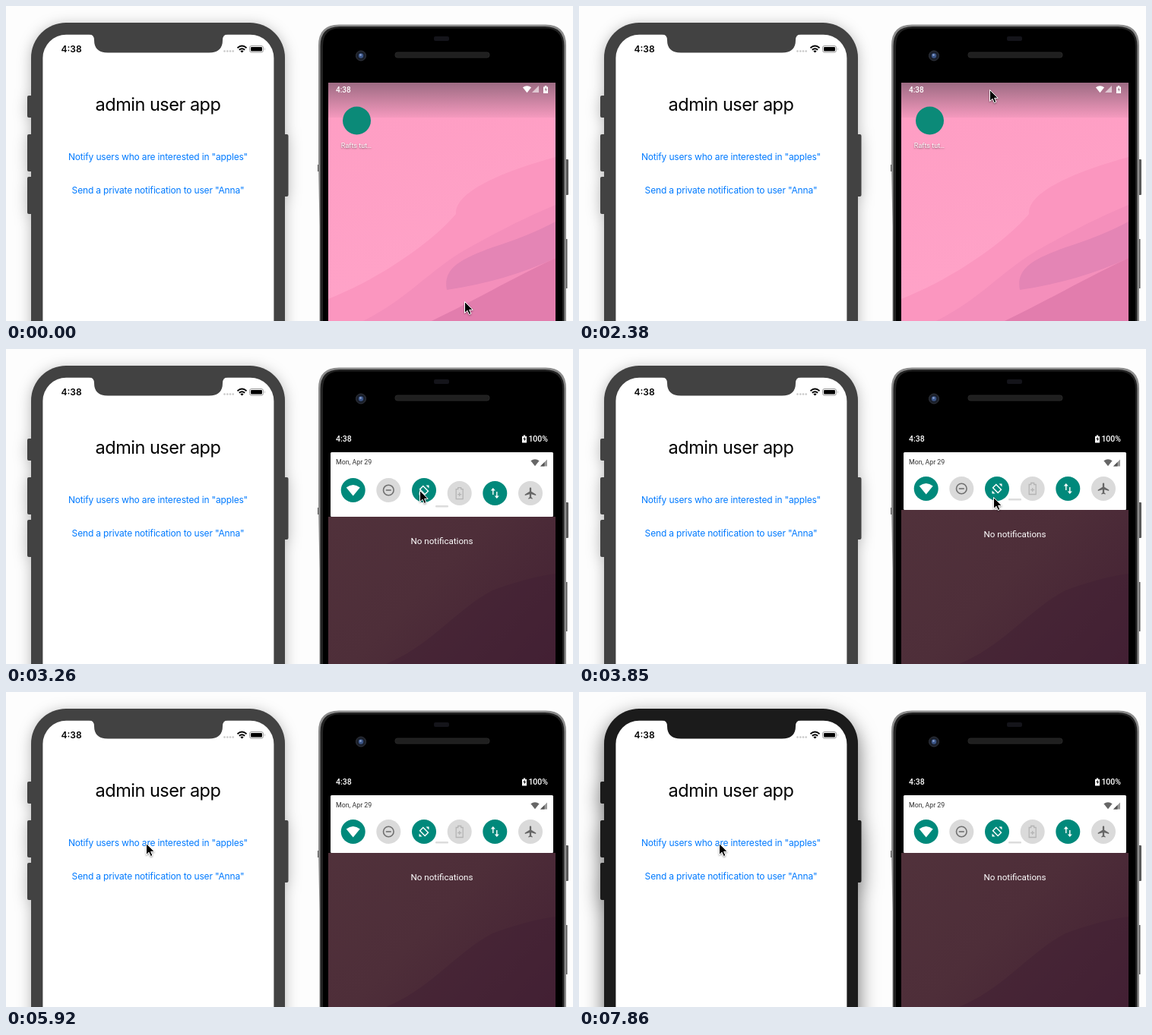
An HTML page for the animation above (8000 ms loop, 746 by 415 pixels).

```html
<!DOCTYPE html>
<html lang="en">
<head>
<meta charset="utf-8">
<title>Notification demo</title>
<style>
  html, body { margin: 0; width: 100%; height: 100%; overflow: hidden; background: #fdfdfd; }
  svg { display: block; width: 746px; height: 415px; }
  text { font-family: Roboto, sans-serif; fill: #fff; }
  .ios text { font-family: Inter, sans-serif; fill: #000; }
  .ios .link { font-size: 12px; letter-spacing: -.17px; fill: #007aff; }
  .body { fill: #424242; filter: drop-shadow(0 3px 9px rgba(0,0,0,.28)); }
  .active .body { fill: #1b1b1b; filter: drop-shadow(0 9px 13px rgba(0,0,0,.58)); }
  .notch { fill: #424242; }
  .active .notch { fill: #1b1b1b; }
  .clock { font-size: 10.5px; font-weight: 500; }
</style>
</head>
<body>
<svg viewBox="0 0 746 415">
  <defs>
    <linearGradient id="scrim" x2="0" y2="1">
      <stop stop-color="#5c4a58" stop-opacity=".6"/><stop offset="1" stop-color="#5c4a58" stop-opacity=".06"/>
    </linearGradient>
    <linearGradient id="pink" x2=".2" y2="1">
      <stop stop-color="#fe9dc3"/><stop offset="1" stop-color="#ffa3c8"/>
    </linearGradient>
    <linearGradient id="dusk" x2="1" y2="1">
      <stop stop-color="#52333c"/><stop offset=".55" stop-color="#4e2e39"/><stop offset="1" stop-color="#432033"/>
    </linearGradient>
    <clipPath id="screen"><path d="M424 101h299v314H424z"/></clipPath>
    <path id="wifi" d="M0 7.5L-9-3.5Q0-10.500 9-3.5Z"/>
    <path id="signal" d="M0 9L9 0V9Z"/>
    <path id="cell" d="M0 1.500H1.800V0H4.200V1.500H6V10H0Z"/>
  </defs>

  <g class="ios" id="ios">
    <g class="body">
      <rect x="33" y="22" width="334" height="500" rx="46"/>
      <path d="M28 120q0-2 2-2h4v29h-4q-2 0-2-2zM28 171q0-2 2-2h4v49h-4q-2 0-2-2zM28 227q0-2 2-2h4v49h-4q-2 0-2-2zM366 169h3.500q2 0 2 2v78q0 2-2 2h-3.500z"/>
    </g>
    <rect x="48.400" y="37.700" width="304" height="470" rx="31" fill="#fff"/>
    <path class="notch" d="M109 37Q116 37.500 116 45Q116 61.600 134 61.600H267Q285 61.600 285 45Q285 37.500 292 37Z"/>
    <text x="72.500" y="61" font-size="12" font-weight="600">4:38</text>
    <g fill="#c8c8c8"><circle cx="287.500" cy="59.500" r="1.300"/><circle cx="291.300" cy="59.500" r="1.300"/><circle cx="295" cy="59.500" r="1.300"/><circle cx="298.700" cy="59.500" r="1.300"/></g>
    <g fill="none" stroke="#000" stroke-width="1.900"><path d="M304.500 55.200Q310.500 50 316.500 55.200M306.800 57.800Q310.500 54.600 314.200 57.800"/></g>
    <path d="M310.500 61.500L308.300 59.300Q310.500 57.500 312.700 59.300Z"/>
    <rect x="320.500" y="52.500" width="18" height="8.500" rx="2.500" fill="none" stroke="#999"/>
    <rect x="322" y="54" width="15" height="5.500" rx="1.200"/>
    <path d="M340 55q1.500 1.700 0 3.500z" fill="#999"/>
    <g text-anchor="middle">
      <text x="200" y="138" font-size="23.500" letter-spacing="-.5">admin user app</text>
      <text class="link" x="200" y="203">Notify users who are interested in "apples"</text>
      <text class="link" x="200" y="247">Send a private notification to user "Anna"</text>
    </g>
  </g>

  <g>
    <path fill="#5a5a5a" d="M736 202h3q1 0 1 1v45q0 1-1 1h-3zM736 307h2.500v65h-2.500zM410 209h3v9h-3z"/>
    <path fill="#8c8c8c" d="M412.500 415V290L411 210V52Q411 24.500 438 24.500H710Q737 24.500 737 52V415Z"/>
    <path fill="#222" d="M413.500 415V53Q413.500 27 439 27H709Q734.500 27 734.500 53V415Z"/>
    <path d="M417 415V53Q417 29.500 439 29.500H709Q732 29.500 732 53V415Z"/>
    <rect x="563" y="40" width="20" height="6" rx="2" fill="#14141a"/>
    <rect x="512" y="61" width="124" height="7" rx="3" fill="#1f1f1f" stroke="#272727"/>
    <circle cx="467" cy="65.500" r="6.500" fill="#1a1f2a" stroke="#33363e"/>
    <circle cx="467" cy="65.500" r="3.200" fill="#3b5588"/><circle cx="466.500" cy="64.500" r="1.300" fill="#8fa6d2"/>
  </g>

  <g id="home" clip-path="url(#screen)">
    <path fill="url(#pink)" d="M424 101h299v314H424z"/>
    <path fill="#fb96bf" d="M424 386C490 360 560 312 592 274C590 248 640 222 723 199V415H424Z"/>
    <path fill="#f48fbb" d="M470 415C530 385 560 345 610 318Q670 284 723 262V415Z"/>
    <path fill="#e485b5" d="M580 374C574 344 602 332 640 318Q690 302 723 284V332Q660 362 580 374Z"/>
    <path fill="#e27dad" d="M560 415C620 386 660 362 723 332V415Z"/>
    <path fill="url(#scrim)" d="M424 101h299v46H424z"/>
    <circle cx="461.500" cy="151" r="18.500" fill="#0b8a78"/>
    <text x="461" y="187" font-size="9" text-anchor="middle" style="text-shadow:0 1px 2px #0008">Rafts tut…</text>
    <text class="clock" x="434" y="114" style="font-size:10px">4:38</text>
    <g fill="#fff">
      <use href="#wifi" transform="translate(685.500 109.500) scale(.62)"/>
      <use href="#signal" x="692" y="105" opacity=".6"/>
      <use href="#cell" x="707" y="105"/>
    </g>
    <path d="M710.500 107l-2 3.500h1.500v2.500l2-3.500h-1.500z" fill="#a07a8e"/>
  </g>

  <g id="shade" clip-path="url(#screen)">
    <path fill="url(#dusk)" d="M424 101h299v314H424z"/>
    <path fill="#42213480" d="M500 415C560 390 590 345 640 318Q690 300 723 296V415Z"/>
    <rect id="black" x="424" y="101" width="299"/>
    <g id="status">
      <text class="clock" x="434" y="122">4:38</text>
      <text class="clock" x="713" y="122" text-anchor="end">100%</text>
      <use href="#cell" x="679" y="113.500" fill="#fff"/>
      <path d="M682.500 115.500l-2 3.500h1.500v2.500l2-3.500h-1.500z"/>
    </g>
    <g id="panel">
      <rect id="card" x="427" width="293" rx="1.500" fill="#fff"/>
      <text x="434" y="15.500" font-size="8.800" style="fill:#333">Mon, Apr 29</text>
      <use href="#wifi" transform="translate(696 13.500) scale(.62)" fill="#666"/>
      <use href="#signal" x="703" y="9.500" fill="#999"/>
      <path d="M703 18.500l5.500-5.500v5.500z" fill="#555"/>
      <g id="tilesA">
        <g transform="translate(456.700)"><circle r="16" fill="#00897b"/><use href="#wifi" fill="#fff"/></g>
        <g transform="translate(503.300)" fill="none" stroke="#707070" stroke-width="1.600"><circle r="16" fill="#dadada" stroke="none"/><circle r="6.800"/><path d="M-3.500 0h7"/></g>
        <g transform="translate(550)">
          <circle r="16" fill="#00897b"/>
          <rect x="-3" y="-4.700" width="6" height="9.400" transform="rotate(-45)" fill="none" stroke="#fff" stroke-width="1.400"/>
          <path d="M2.500-6.500H6.500V-2.500ZM-2.500 6.500H-6.500V2.500Z" fill="#fff"/>
        </g>
      </g>
      <g id="tilesB">
        <g transform="translate(596.700)" fill="none" stroke="#b4b4b4" stroke-width="1.300"><circle r="16" fill="#dadada" stroke="none"/><path d="M-4.500-5.500h2.500v-2h4v2h2.500V7.500h-9zM-2.500 1.500h5M0-1v5"/></g>
        <g transform="translate(643.300)"><circle r="16" fill="#00897b"/><path d="M-2.500-7L-5.500-3.500H-3.200V2H-1.800V-3.500H.5ZM2.500 7L5.500 3.500H3.200V-2H1.800V3.500H-.5Z" fill="#fff"/></g>
        <g transform="translate(690)"><circle r="16" fill="#dadada"/><path transform="scale(.76) translate(-11.500 -12)" fill="#666" d="M21 16v-2l-8-5V3.500c0-.83-.67-1.500-1.500-1.500S10 2.670 10 3.500V9l-8 5v2l8-2.500V19l-2 1.500V22l3.500-1 3.500 1v-1.500L13 19v-5.500l8 2.500z"/></g>
      </g>
      <rect id="handle" x="565" width="17" height="2.500" rx="1" fill="#dcdcdc"/>
    </g>
    <text id="empty" x="573.500" font-size="11.600" text-anchor="middle">No notifications</text>
  </g>

  <path id="cursor" d="M.5 .5V15.500L4 12.200L6.400 17.500L8.900 16.400L6.600 11.300H11.200Z" stroke="#fff" style="filter:drop-shadow(0 1px 1px #0006)"/>
</svg>
<script>
const LOOP = 8000, START = 900, STEP = 147.6;
const $ = id => document.getElementById(id);
const show = (id, on) => $(id).style.display = on ? '' : 'none';
const move = (id, x, y) => $(id).setAttribute('transform', `translate(${x} ${y})`);

// Each key is [step, ...values]; values between keys are linear.
const pointer = [
  [-1, 603, 389], [1, 592, 345], [4, 546, 215], [6, 521, 140], [7, 521, 119],
  [9, 540, 110], [11, 540, 110], [12, 541, 120], [14, 543, 163], [16, 544, 186],
  [17, 545, 195], [21, 545, 195], [22, 536, 215], [24, 465, 290], [25, 405, 312],
  [27, 275, 272], [29, 193, 219], [31, 186, 205], [34, 184, 199]
];
const panelTop = [[11, 109], [13, 136]];
const pull = [[13, 0], [16, 9], [17, 14], [18, 9], [20, 0]];

function track(keys, n) {
  const i = keys.findIndex(k => k[0] >= n);
  if (i < 0) return keys.at(-1).slice(1);
  if (i === 0) return keys[0].slice(1);
  const a = keys[i - 1], b = keys[i], p = (n - a[0]) / (b[0] - a[0]);
  return a.slice(1).map((v, j) => v + (b[j + 1] - v) * p);
}

function draw(t) {
  const n = Math.max(-1, Math.floor((t - START + 5) / STEP));
  const [x, y] = track(pointer, n);
  const [top] = track(panelTop, n);
  const [stretch] = track(pull, n);
  const height = 76 + stretch, open = n >= 11;

  move('cursor', x, y);
  $('ios').classList.toggle('active', n >= 39);
  show('home', !open);
  show('shade', open);
  show('status', n >= 13);
  show('empty', n >= 13);
  move('panel', 0, top);
  move('tilesA', 0, 48 + stretch * .22);
  move('tilesB', 0, 48 + stretch * .67);
  $('card').setAttribute('height', height);
  $('handle').setAttribute('y', height - 15);
  $('black').setAttribute('height', top + height - 101);
  $('empty').setAttribute('y', top + height + 35.5);
}

const origin = performance.now();
function loop() {
  draw((performance.now() - origin) % LOOP);
  requestAnimationFrame(loop);
}
loop();
</script>
</body>
</html>
```
